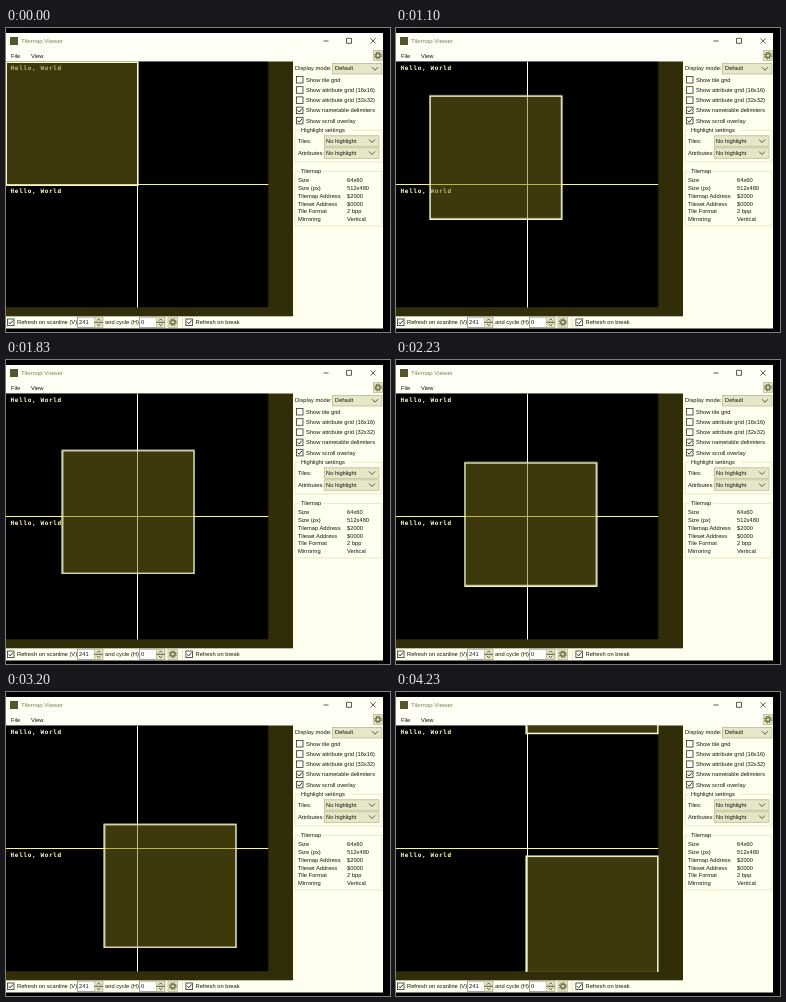
Write an HTML page that moves like this. It is 384x304 px and loops after 4.26 s.

```html
<!DOCTYPE html>
<html lang="en">
<head>
<meta charset="utf-8">
<title>Tilemap Viewer</title>
<style>
  html, body { margin: 0; width: 100%; height: 100%; overflow: hidden; background: #000; }
  svg { display: block; width: 100%; height: 100%; }
  text { font: 5.75px "Liberation Sans", Arial, sans-serif; fill: #14140a; }
  .title { font-size: 6.15px; fill: #83835a; }
  .tiles text { font: bold 6px "DejaVu Sans Mono", monospace; letter-spacing: .66px; fill: #ffffc8; }
  .line { fill: none; stroke: #33331c; stroke-width: .8; }
  .group { fill: none; stroke: #dedeb8; stroke-width: .7; }
  .combo { fill: #e6e6c8; stroke: #b4b48a; stroke-width: .7; }
  .field { fill: #fff; stroke: #85855c; stroke-width: .7; }
  .scroll rect { fill: rgba(122, 114, 24, .5); stroke: #ffffd2; stroke-width: 1.5; }
  /* 2 tilemap pixels per step at a scale of .512 */
  .scroll { animation: scroll 4260ms steps(128) -5ms infinite; }
  @keyframes scroll { to { transform: translate(131.07px, 131.07px); } }
</style>
</head>
<body>
<svg viewBox="0 0 384 304">
  <defs>
    <clipPath id="map"><rect y="33.5" width="262.5" height="246"/></clipPath>
    <path id="chevron" class="line" d="M-3 -1.5L0 1.5L3 -1.5"/>
    <g id="box"><rect class="line" x=".4" y=".4" width="6.6" height="6.6" style="fill:#fff"/></g>
    <g id="checked"><use href="#box"/><path class="line" d="M1.7 3.7L3.2 5.3L6 1.9" style="stroke-width:1"/></g>
    <g id="gear">
      <circle r="3.1" fill="none" stroke="#77774e" stroke-width="1.6" stroke-dasharray="1.4 1.03"/>
      <circle r="2" fill="none" stroke="#77774e" stroke-width="1.4"/>
    </g>
    <g id="spin">
      <rect class="field" x=".4" y=".4" width="25.4" height="10.4"/>
      <rect class="combo" x="17.5" y=".4" width="8.3" height="10.4"/>
      <path class="line" d="M17.5 5.6h8.3M20 3.9l1.7 -1.7l1.7 1.7M20 7.3l1.7 1.7l1.7 -1.7"/>
    </g>
  </defs>

  <!-- Window -->
  <rect y="5" width="377" height="295.5" fill="#fffff0"/>
  <rect y="5" width="377" height="28.5" fill="#fffff6"/>
  <rect x="4" y="9" width="8" height="8" fill="#55552f"/>
  <text class="title" x="15" y="15.3">Tilemap Viewer</text>
  <path class="line" d="M317.5 13h5M340.5 10.3h5v5h-5zM364.5 10.3l5.2 5.2M369.7 10.3l-5.2 5.2"/>
  <text x="5" y="29.6">File</text>
  <text x="25" y="29.6">View</text>
  <rect class="combo" x="367.5" y="22.6" width="9" height="9.8"/>
  <use href="#gear" x="372" y="27.5"/>

  <!-- Tilemap -->
  <rect y="33.5" width="287" height="254.8" fill="#302d08"/>
  <g clip-path="url(#map)">
    <rect y="33.5" width="262.5" height="246"/>
    <g class="tiles">
      <text x="4.6" y="42.2">Hello, World</text>
      <text x="4.6" y="165">Hello, World</text>
    </g>
    <path d="M0 156.5H262.5" stroke="#f4f4a0"/>
    <path d="M131.5 33.5V280" stroke="#ffffec"/>
    <g class="scroll">
      <rect x=".2" y="34.2" width="131.6" height="123"/>
      <rect x=".2" y="-211.6" width="131.6" height="123"/>
    </g>
  </g>

  <!-- Settings -->
  <text x="289" y="42.2">Display mode:</text>
  <rect class="combo" x="326.4" y="35.4" width="49.6" height="10.6"/>
  <text x="329" y="42.2">Default</text>
  <use href="#chevron" x="369" y="40.7"/>

  <use href="#box" x="290" y="48"/>
  <text x="300" y="53.6">Show tile grid</text>
  <use href="#box" x="290" y="58.3"/>
  <text x="300" y="63.9">Show attribute grid (16x16)</text>
  <use href="#box" x="290" y="68.5"/>
  <text x="300" y="74.2">Show attribute grid (32x32)</text>
  <use href="#checked" x="290" y="78.7"/>
  <text x="300" y="84.4">Show nametable delimiters</text>
  <use href="#checked" x="290" y="88.9"/>
  <text x="300" y="94.6">Show scroll overlay</text>

  <path class="group" d="M294 102.3H289V134H376V102.3H345"/>
  <text x="295" y="104">Highlight settings</text>
  <text x="292" y="115.2">Tiles:</text>
  <rect class="combo" x="318.4" y="107.8" width="54.6" height="10.5"/>
  <text x="320" y="115.2">No highlight</text>
  <use href="#chevron" x="366" y="113"/>
  <text x="292" y="127.2">Attributes:</text>
  <rect class="combo" x="318.4" y="119.8" width="54.6" height="10.5"/>
  <text x="320" y="127.2">No highlight</text>
  <use href="#chevron" x="366" y="125"/>

  <path class="group" d="M294 143.3H289V198H376V143.3H317"/>
  <text x="295" y="145.2">Tilemap</text>
  <text x="292" y="154.2">Size</text>             <text x="341" y="154.2">64x60</text>
  <text x="292" y="162">Size (px)</text>          <text x="341" y="162">512x480</text>
  <text x="292" y="169.8">Tilemap Address</text>  <text x="341" y="169.8">$2000</text>
  <text x="292" y="177.5">Tileset Address</text>  <text x="341" y="177.5">$0000</text>
  <text x="292" y="185.2">Tile Format</text>      <text x="341" y="185.2">2 bpp</text>
  <text x="292" y="193">Mirroring</text>          <text x="341" y="193">Vertical</text>

  <!-- Refresh bar -->
  <use href="#checked" x="1" y="290.6"/>
  <text x="11" y="296.2">Refresh on scanline (V)</text>
  <use href="#spin" x="71" y="288.7"/>
  <text x="73" y="296.2">241</text>
  <text x="99" y="296.2">and cycle (H)</text>
  <use href="#spin" x="133" y="288.7"/>
  <text x="135" y="296.2">0</text>
  <rect class="combo" x="162" y="289" width="9.6" height="10.4"/>
  <use href="#gear" x="166.8" y="294.2"/>
  <path class="group" d="M176.5 289.5V299.5"/>
  <use href="#checked" x="179.5" y="290.6"/>
  <text x="189.5" y="296.2">Refresh on break</text>
</svg>
</body>
</html>
```
